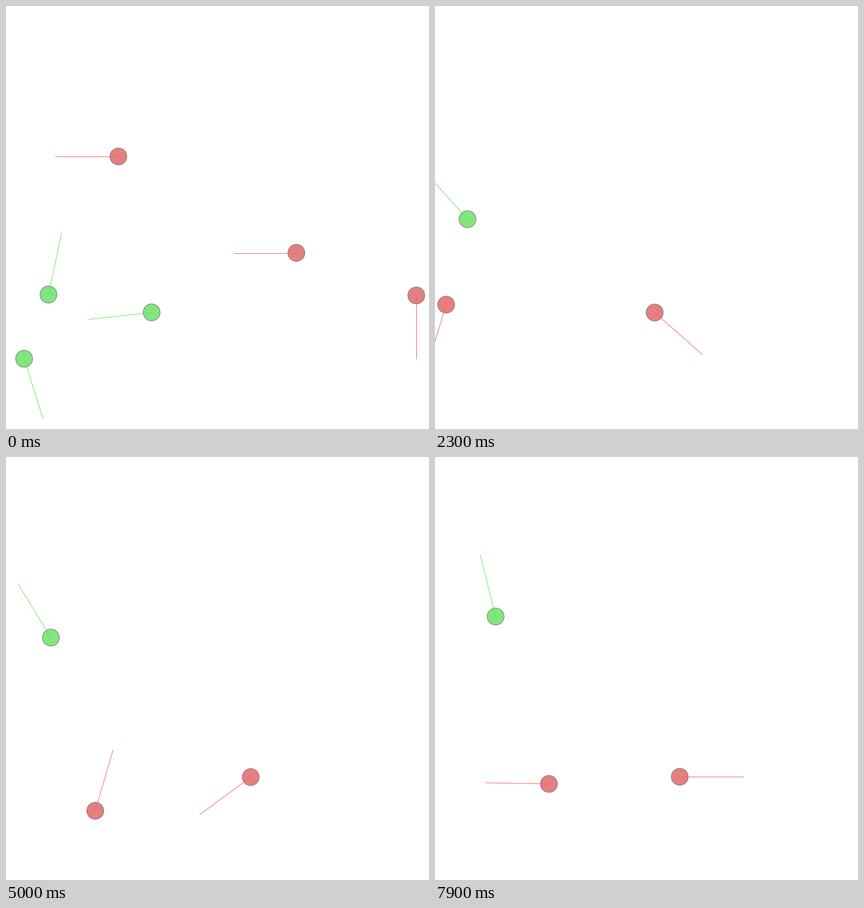
Recreate the animation shown at these times as a matplotlib script. Size 700 by 700 pixels, loop 8000 ms.

```python
import numpy as np
import matplotlib.pyplot as plt
from matplotlib.animation import FuncAnimation
from matplotlib.patches import Circle

SIZE, DPI = 700, 100
FRAMES, STEP = 80, 100
RADIUS, REACH = 14, 105
PX = 72 / DPI

RED = ("#e67f7f", "#ec6464")
GREEN = ("#80e680", "#68de68")

# moments at which the robots pass their waypoints
TIMES = np.array([0, 1000, 1800, 3000, 4100, 5900, 7900], float)
LEAVE = 2200


def pose(x, y, heading, sway=0):
    """A waypoint; sway is the extra swing of the heading on the way to the next one."""
    return x, y, heading, sway


def slopes(t, v):
    """Harmonic means of neighbouring rates, so that no stretch overshoots."""
    rate = np.diff(v, axis=0) / np.diff(t)[:, None]
    a, b = rate[:-1], rate[1:]
    total = np.where(a + b == 0, 1, a + b)
    inner = np.where(a * b > 0, 2 * a * b / total, 0)
    return np.vstack([rate[:1], inner, rate[-1:]])


class Robot:
    def __init__(self, ax, colors, *poses):
        fill, ray = colors
        rows = np.array(poses, float)
        self.t = TIMES[:len(rows)]
        self.v, self.sway = rows[:, :3], rows[:, 3]
        self.m = slopes(self.t, self.v)
        self.until = LEAVE if len(rows) < len(TIMES) else np.inf
        self.body = ax.add_patch(Circle((0, 0), RADIUS, fc=fill, ec="#77706c",
                                        lw=0.9 * PX, zorder=2))
        self.ray, = ax.plot([], [], color=ray, lw=0.9 * PX, zorder=3,
                            solid_capstyle="butt")

    def at(self, now):
        t, v, m = self.t, self.v, self.m
        if now >= t[-1]:
            return v[-1] + m[-1] * (now - t[-1])
        i = np.searchsorted(t, now, "right") - 1
        h = t[i + 1] - t[i]
        u = (now - t[i]) / h
        w = 1 - u
        state = (w * w * ((1 + 2 * u) * v[i] + u * h * m[i])
                 + u * u * ((1 + 2 * w) * v[i + 1] - w * h * m[i + 1]))
        state[2] += self.sway[i] * np.sin(np.pi * u) ** 2
        return state

    def move(self, now):
        shown = now < self.until
        self.body.set_visible(shown)
        self.ray.set_visible(shown)
        if shown:
            x, y, heading = self.at(now)
            a = np.radians(heading)
            self.body.center = x, y
            self.ray.set_data([x, x + REACH * np.cos(a)],
                              [y, y - REACH * np.sin(a)])
        return self.body, self.ray


fig = plt.figure(figsize=(SIZE / DPI, SIZE / DPI), dpi=DPI, facecolor="white")
ax = fig.add_axes([0, 0, 1, 1])
ax.set(xlim=(0, SIZE), ylim=(SIZE, 0))
ax.axis("off")

robots = [
    Robot(ax, RED, pose(186, 249, 180, 60), pose(150.5, 288, 96),
          pose(74, 237.5, 164)),
    Robot(ax, RED, pose(480.5, 408.5, 180), pose(260, 408.5, 180),
          pose(49.5, 425, 222), pose(-0.5, 597.5, 298), pose(105.5, 606.5, 360),
          pose(172, 558.5, 494), pose(188.5, 541, 539)),
    Robot(ax, RED, pose(679, 479, 270), pose(478.5, 498.7, 181),
          pose(338, 502.5, 66, -25), pose(406, 516, -95), pose(405, 530, -95, 25),
          pose(405, 529.3, -270, 50), pose(405, 529.2, -360)),
    Robot(ax, GREEN, pose(70.3, 477.5, 78, 60), pose(67.7, 431, 60),
          pose(59.5, 378, 95), pose(48.7, 324.7, 170, -35), pose(80, 296, 56, 60),
          pose(68.5, 301.7, 72, 15), pose(100.3, 264, 104)),
    Robot(ax, GREEN, pose(241, 507, 186.5), pose(353.7, 491.7, 6),
          pose(451.3, 452, 14)),
    Robot(ax, GREEN, pose(30, 583.7, -72.5, -60), pose(36.5, 596.7, 3.7, -60),
          pose(47, 629.3, -36)),
]


def draw(frame):
    return [part for robot in robots for part in robot.move(frame * STEP)]


anim = FuncAnimation(fig, draw, frames=FRAMES, interval=STEP, repeat=True,
                     repeat_delay=0)
plt.show()
```
